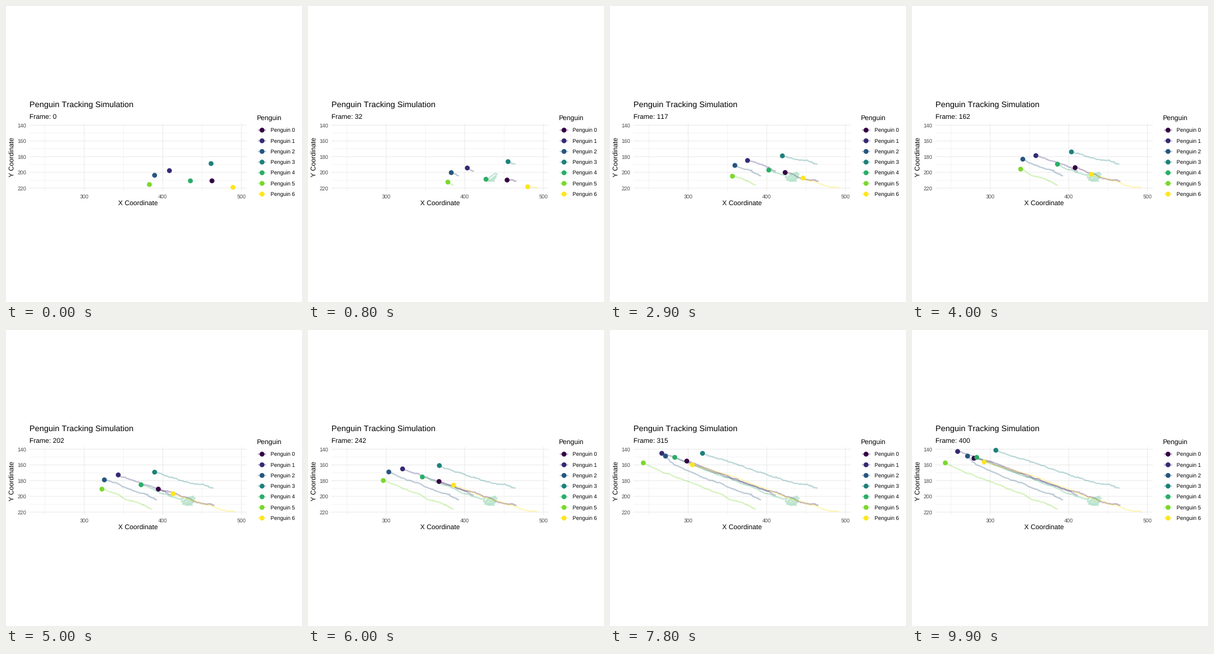
Animation of 480x480 px, one loop 10000 ms. Source, as a matplotlib script:

```python
import numpy as np
import matplotlib.pyplot as plt
from matplotlib.animation import FuncAnimation

SIZE, DPI = 480, 72          # at 72 dpi one point is one pixel
FRAMES, LAST_COUNT = 100, 400
STEP = 0.5                   # trail samples, in frames
LEFT, RIGHT, TOP, BOTTOM = 38, 390.5, 189.9, 300
COLORS = ["#340044", "#332a73", "#26557e", "#1e807b",
          "#2aae67", "#7ad82d", "#fde61e"]

plt.rcParams.update({"font.family": "Liberation Sans",
                     "text.hinting": "none",
                     "text.kerning_factor": 6})   # plain advance widths
rng = np.random.default_rng(4)

# Pose of each penguin, in pixels, at these times; a shorter list stops early.
TIMES = np.array([0, 16, 29, 50, 69, 78, 82])
POSES = [
    [(334, 283.5), (310, 280), (284, 270), (247, 258), (182, 233.5),
     (124.5, 212.5), (100.5, 208)],
    [(265, 267), (251, 259), (223, 250.5), (182, 235), (128.5, 215),
     (84, 200), (74, 197)],
    [(241, 274.5), (226, 266), (202.5, 258.5), (159.5, 243), (104, 218.5),
     (90, 204.5)],
    [(332.5, 255.5), (313.5, 250.5), (279.5, 243), (241, 230.5),
     (186, 211.5), (150, 200), (136, 195)],
    [(299, 283.5), (283, 274), (257.5, 266), (219, 251), (155.5, 227.5),
     (105, 206.5)],
    [(232.5, 289.5), (220, 283), (198.5, 276), (155.5, 258), (92.5, 233),
     (54, 215.5)],
    [(368, 294), (342, 289.5), (313, 279), (271, 265.5), (204.5, 239),
     (133.5, 218.5), (117, 214)],
]
SCRIBBLER = 4                # this one circles about before it sets off


def wander(t, keys, step):
    """Random walk that returns to zero at every key time."""
    walk = np.cumsum(rng.normal(0, step, t.size))
    return walk - np.interp(t, keys, np.interp(keys, t, walk))


def track(poses, scribble=False):
    """Times and positions along one penguin's path."""
    keys = TIMES[:len(poses)]
    t = np.arange(0, keys[-1] + STEP / 2, STEP)
    x, y = (np.interp(t, keys, c) for c in np.transpose(poses))
    x += wander(t, keys, 0.3)
    y += wander(t, keys, 0.35)
    if scribble:
        swing = np.sin(np.pi * np.clip(t / TIMES[1], 0, 1))
        x += swing * (6 + 9 * np.sin(2.2 * t))
        y -= swing * 7 * np.sin(2.2 * t + 0.6)
    # the trail begins just behind the first pose
    return np.r_[-1, t], np.r_[x[0] + 4, x], np.r_[y[0] + 1, y]


tracks = [track(p, i == SCRIBBLER) for i, p in enumerate(POSES)]

fig = plt.figure(figsize=(SIZE / DPI, SIZE / DPI), dpi=DPI, facecolor="white")
ax = fig.add_axes([0, 0, 1, 1])
ax.set(xlim=(0, SIZE), ylim=(SIZE, 0))
ax.axis("off")


def label(x, y, text, size=11, color="black", **kw):
    return ax.text(x, y, text, fontsize=size, color=color, **kw)


def grid(xs, ys, width):
    style = dict(color="#ebebeb", lw=width, zorder=0, snap=False)
    ax.vlines(xs, TOP, BOTTOM, **style)
    ax.hlines(ys, LEFT, RIGHT, **style)


def trail(color, x=(), y=()):
    return ax.plot(x, y, color=color, lw=2.1, alpha=0.3, zorder=2, snap=False,
                   solid_capstyle="butt", solid_joinstyle="round")[0]


def dot(color, x=0, y=0):
    # a patch, since markers would jump between whole pixels
    return ax.add_patch(plt.Circle((x, y), 3.95, fc=color, lw=0, zorder=3))


def px(x):
    return 126.8 + (x - 300) * 1.275


def py(y):
    return 193.3 + (y - 140) * 1.275


x_major, y_major = np.arange(300, 501, 100), np.arange(140, 221, 20)
grid(px(x_major - 50), py(y_major[:-1] + 10), 0.53)
grid(px(x_major), py(y_major), 1.07)
for v in x_major:
    label(px(v), 312, v, 8.8, "#4d4d4d", ha="center")
for v in y_major:
    label(33.3, py(v) + 3.2, v, 8.8, "#4d4d4d", ha="right")

label(38, 164, "Penguin Tracking Simulation", 13.2)
counter = label(38, 183, "")
label((LEFT + RIGHT) / 2, 324.3, "X Coordinate", ha="center")
label(13.4, (TOP + BOTTOM) / 2, "Y Coordinate", ha="center",
      rotation=90, rotation_mode="anchor")

label(406.5, 186, "Penguin")
for i, color in enumerate(COLORS):
    y = 201.3 + 17.28 * i
    trail(color, [408.3, 422.1], [y, y])
    dot(color, 415.2, y)
    label(429.3, y + 3.2, f"Penguin {i}", 8.8)

trails = [trail(c) for c in COLORS]
dots = [dot(c) for c in COLORS]


def draw(frame):
    counter.set_text(f"Frame: {round(frame * LAST_COUNT / (FRAMES - 1))}")
    for (t, x, y), line, head in zip(tracks, trails, dots):
        n = np.searchsorted(t, frame, side="right")
        line.set_data(x[:n], y[:n])
        head.center = x[n - 1], y[n - 1]
    return [counter, *trails, *dots]


anim = FuncAnimation(fig, draw, frames=FRAMES, interval=100, repeat=True,
                     init_func=lambda: draw(0))
plt.show()
```
